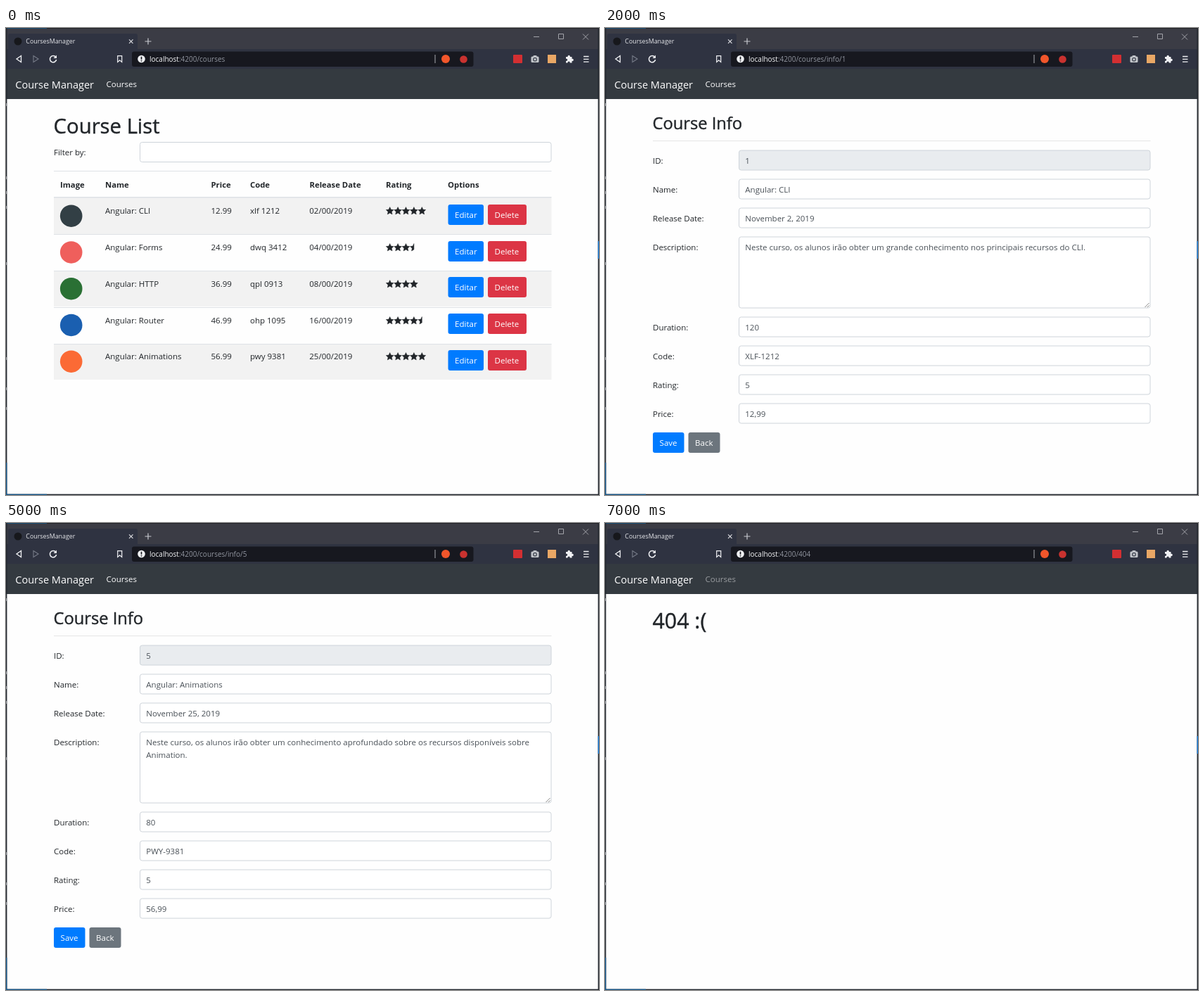
These frames come from a looping animation (843x664 px, 8 s). An HTML page:

```html
<!DOCTYPE html>
<html lang="en">
<head>
<meta charset="utf-8">
<title>Course Manager</title>
<style>
  html, body { margin: 0; width: 100%; height: 100%; overflow: hidden; background: #fff; }
  svg { display: block; width: 843px; height: 664px; }
  text { font-family: "Open Sans", "Noto Sans", sans-serif; white-space: pre; }
</style>
</head>
<body>
<svg id="stage" viewBox="0 0 843 664" xmlns="http://www.w3.org/2000/svg">
  <rect width="843" height="664" fill="#fefefe"/>
  <g id="frame"></g>
  <g id="url"></g>
  <g id="page"></g>
</svg>
<script>
const INK = '#212529', FIELD = '#495057', EDGE = '#ced4da', LINE = '#dee2e6';
const BLUE = '#007bff', RED = '#dc3545', GRAY = '#6c757d';
const BODY = 11.5, ROW = 51.75, STAR = 11.4;

const courses = [
  { id: 1, name: 'CLI', price: 12.99, code: 'xlf 1212', day: 2, rating: 5, minutes: 120, color: '#323f45',
    about: ['Neste curso, os alunos irão obter um grande conhecimento nos principais recursos do CLI.'] },
  { id: 2, name: 'Forms', price: 24.99, code: 'dwq 3412', day: 4, rating: 3.5, color: '#ef5f5c' },
  { id: 3, name: 'HTTP', price: 36.99, code: 'qpl 0913', day: 8, rating: 4, color: '#2a7034' },
  { id: 4, name: 'Router', price: 46.99, code: 'ohp 1095', day: 16, rating: 4.5, color: '#1a5fb0' },
  { id: 5, name: 'Animations', price: 56.99, code: 'pwy 9381', day: 25, rating: 5, minutes: 80, color: '#fb6a35',
    about: ['Neste curso, os alunos irão obter um conhecimento aprofundado sobre os recursos disponíveis sobre',
            'Animation.'] }
];

const text = (x, y, s, fill = INK, size = BODY, extra = '') =>
  `<text x="${x}" y="${y}" font-size="${size}" fill="${fill}" ${extra}>${s}</text>`;
const rect = (x, y, w, h, fill, r = 0, extra = '') =>
  `<rect x="${x}" y="${y}" width="${w}" height="${h}" rx="${r}" fill="${fill}" ${extra}/>`;
const circle = (x, y, r, fill) => `<circle cx="${x}" cy="${y}" r="${r}" fill="${fill}"/>`;
const stroke = (d, color, w = 1, fill = 'none') =>
  `<path d="${d}" fill="${fill}" stroke="${color}" stroke-width="${w}"/>`;
const heading = (y, s, size) =>
  text(67.5, y, s, INK, size, `stroke="${INK}" stroke-width=".4"`);
const button = (x, y, w, s, fill) =>
  rect(x, y, w, 29, fill, 3) + text(x + 9.6, y + 19, s, '#fff');
const box = (y, h, fill = '#fff', edge = EDGE) =>
  rect(190.5, y + .5, 584.5, h - 1, fill, 3, `stroke="${edge}"`);

function stars(x, y, rating) {
  let out = '';
  for (let i = 0; i < rating; i++) {
    const half = rating - i < 1;
    const cx = x + STAR * (i + .5);
    const pts = [];
    for (let k = 0; k <= (half ? 5 : 9); k++) {
      const r = k % 2 ? 2.7 : 5.7, a = -Math.PI / 2 - k * Math.PI / 5;
      pts.push((cx + r * Math.cos(a)).toFixed(2) + ',' + (y + r * Math.sin(a)).toFixed(2));
    }
    out += `<polygon points="${pts.join(' ')}" fill="${INK}" stroke="${INK}" stroke-width=".5" stroke-linejoin="round"/>`;
  }
  return out;
}

function courseRow(c, i) {
  const top = 241.5 + ROW * i, y = Math.round(top);
  const base = Math.round(top + 22.8), by = Math.round(top + 9.4);
  const day = String(c.day).padStart(2, '0');
  return (i % 2 ? '' : rect(68, y, 707.5, 51, '#f2f2f2')) +
    (i ? rect(68, y, 707.5, 1, LINE) : '') +
    circle(92.7, top + 25.7, 15.8, c.color) +
    text(141, base, 'Angular: ' + c.name) +
    text(291.5, base, c.price) +
    text(347, base, c.code) +
    text(431.3, base, day + '/00/2019') +
    stars(540, base - 3.7, c.rating) +
    button(628.5, by, 50.5, 'Editar', BLUE) +
    button(685, by, 55, 'Delete', RED);
}

function listPage(filter = '') {
  const columns = [['Image', 77], ['Name', 141], ['Price', 291.5], ['Code', 347],
    ['Release Date', 431.5], ['Rating', 540], ['Options', 628]];
  return heading(150, 'Course List', 29.3) +
    text(68, 181, 'Filter by:') +
    box(162, 29, '#fff', filter ? '#80bdff' : EDGE) +
    text(199.3, 181, filter, FIELD) +
    rect(68, 203, 707.5, 1, LINE) +
    columns.map(([s, x]) => text(x, 227, s, INK, 11.3, 'font-weight="700"')).join('') +
    courses.filter(c => c.name.toLowerCase().includes(filter)).map(courseRow).join('') +
    rect(68, 240, 707.5, 1.7, LINE);
}

function infoPage(c) {
  const fields = [
    ['ID:', c.id, 174], ['Name:', 'Angular: ' + c.name, 215],
    ['Release Date:', `November ${c.day}, 2019`, 256], ['Description:', '', 297],
    ['Duration:', c.minutes, 411], ['Code:', c.code.toUpperCase().replace(' ', '-'), 452],
    ['Rating:', c.rating, 493], ['Price:', String(c.price).replace('.', ','), 534]
  ];
  return heading(144, 'Course Info', 23.7) +
    rect(68, 160, 707.5, 1, '#e5e5e5') +
    fields.map(([label, value, y], i) =>
      text(68, y + 18.5, label) +
      box(y - .5, i === 3 ? 102 : 29, i ? '#fff' : '#e9ecef') +
      text(199.3, y + 19.3, value, FIELD)).join('') +
    c.about.map((s, i) => text(199.3, 315.5 + 18.3 * i, s, FIELD)).join('') +
    stroke('M767.5 397l6-6M771 397l2.5-2.5', '#777', .9) +
    button(68, 575, 44.5, 'Save', BLUE) +
    button(118.5, 575, 45, 'Back', GRAY);
}

const missingPage = () => heading(150, '404 :(', 30.3);

function browserFrame() {
  const white = '#f0f1f4';
  const gear = 'M796 41h2.6a1.7 1.7 0 1 1 3.2 0h2.700v2.800a1.700 1.700 0 1 1 0 3.200v2.600h-2.900a1.600 1.600 0 1 0-3 0h-2.600v-2.800a1.600 1.600 0 1 0 0-3z';
  return rect(0, 0, 843, 31, '#3b3c45') +
    rect(0, 30, 843, 28, '#2f3341') +
    `<path d="M3 31V11q0-3 3-3h178q3 0 3 3v20z" fill="#2f3341"/>` +
    circle(17, 19, 5.5, '#17181c') +
    text(28.3, 22.2, 'CoursesManager', '#e6e7ea', 8.85) +
    stroke('M175 16.300l5.500 5.500m0-5.500l-5.500 5.500', '#d8d9dd', 1.2) +
    stroke('M197.500 19h9M202 14.500v9', '#c9cad0', 1.2) +
    stroke('M750 12.500h8', '#a3a4aa') +
    stroke('M785.500 8.500h7v7h-7z', '#a3a4aa') +
    stroke('M820 8.500l8 8m0-8l-8 8', '#a3a4aa') +
    stroke('M21.500 39.500v9l-6.500-4.500z', white, 1.3) +
    stroke('M39 39.500v9l7-4.500z', '#767b88', 1.1) +
    stroke('M70.800 41.500a4.600 4.600 0 1 0 .8 3.500', white, 1.5) +
    `<path d="M72 38.500v4.500h-4.500z" fill="${white}"/>` +
    stroke('M158.700 39.700h6v8.800l-3-2.600-3 2.600z', white, 1.2) +
    rect(179, 33.500, 485.500, 21.500, '#17181f', 3) +
    circle(192.500, 44, 5.300, white) +
    rect(191.700, 40.700, 1.600, 4.200, '#17181f') +
    rect(191.700, 46, 1.600, 1.500, '#17181f') +
    rect(609.500, 38, 1, 12, '#a7a9b0') +
    circle(625, 44, 6, '#f1562b') +
    circle(650.500, 44.500, 5.300, '#c9322f') +
    rect(721, 38, 13, 12, '#d32f32', 1) +
    rect(746.500, 40.500, 11, 8.500, '#c3c6cb', 1.500) +
    rect(749.500, 39, 5, 3, '#c3c6cb', 1) +
    circle(752, 44.700, 2.900, '#424753') + circle(752, 44.700, 1.600, '#c3c6cb') +
    rect(770, 38, 12, 12, '#e9a765') +
    `<path d="${gear}" fill="${white}"/>` +
    stroke('M821 40.500h7.500M821 44.300h7.500M821 48.100h7.500', white, 1.300) +
    rect(0, 58, 843, 43, '#343a40') +
    text(13.300, 86, 'Course Manager', '#fff', 14.500) +
    rect(0, 0, 843, 1, '#202126') + rect(0, 0, 58, 1, '#164a70') +
    rect(0, 0, 1.400, 664, '#20242b') + rect(841.600, 0, 1.400, 664, '#20242b') +
    rect(0, 662.700, 843, 1.300, '#20242b') +
    rect(0, 618, 1.400, 46, '#17598c') + rect(0, 662.700, 58, 1.300, '#17598c') +
    rect(841.600, 303, 1.400, 25, '#1979d2') +
    [109, 213, 234, 255, 335, 470, 513, 541].map(y => rect(0, y - 2, 1, 4, '#8a8d92')).join('');
}

// One scene per second
const info = n => ['courses/info/' + n, () => infoPage(courses[n - 1])];
const list = filter => ['courses', () => listPage(filter)];
const scenes = [list(), list('cli'), info(1), list(), list('ani'), info(5), list(), ['404', missingPage]];

const layer = id => document.getElementById(id);
let shown = -1;

function draw(ms) {
  const n = Math.floor(ms % 8000 / 1000);
  if (n === shown) return;
  shown = n;
  const [path, page] = scenes[n];
  layer('url').innerHTML =
    text(204, 47.800, `localhost<tspan fill="#9296a0">:4200/${path}</tspan>`, '#f4f5f7', 10) +
    text(142.500, 84.300, 'Courses', path === '404' ? '#9a9da0' : '#fff');
  layer('page').innerHTML = page();
}

layer('frame').innerHTML = browserFrame();
const start = performance.now();
function tick() {
  draw(performance.now() - start);
  requestAnimationFrame(tick);
}
tick();
</script>
</body>
</html>
```
